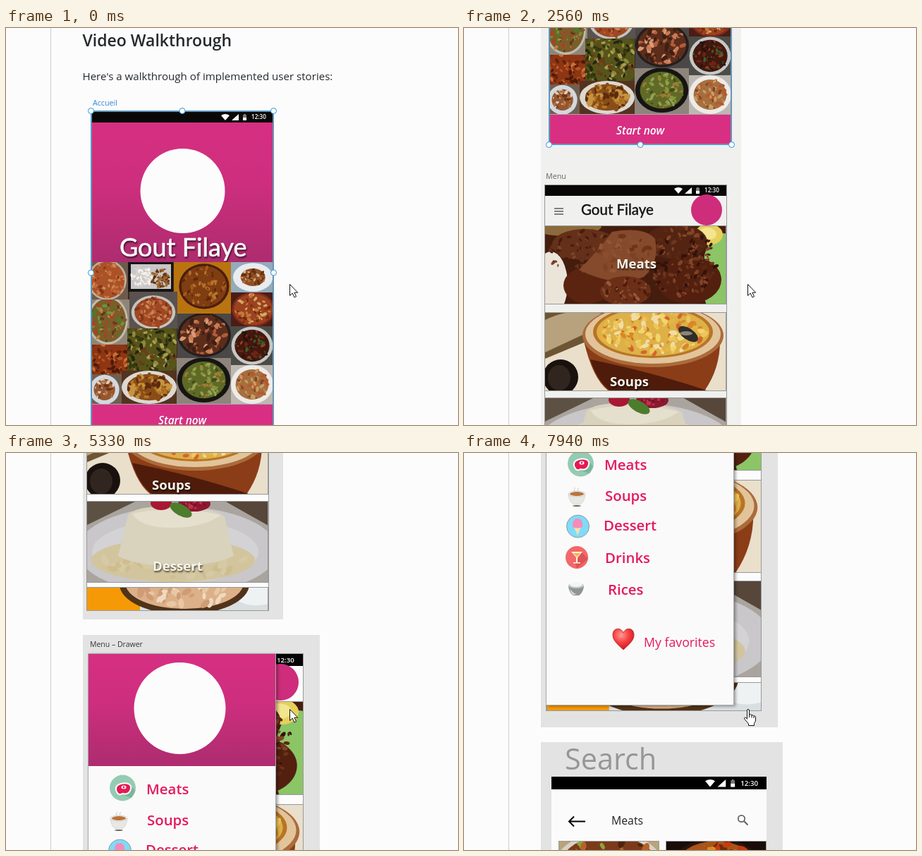
Write an HTML page that moves like this. It is 641 by 563 pixels and loops after 8 s.

```html
<!DOCTYPE html>
<html lang="en">
<head>
<meta charset="utf-8">
<title>Video Walkthrough</title>
<style>
  html, body { margin: 0; width: 100%; height: 100%; overflow: hidden; background: #fcfcfc; }
  #stage { display: block; width: 641px; height: 563px; font-family: "Open Sans", "Noto Sans", sans-serif; }
  .brand { font-family: Lato, "Open Sans", sans-serif; }
  .raised { filter: drop-shadow(1px 2px 1px rgba(0, 0, 0, .65)); }
  .drawer { filter: drop-shadow(2px 2px 2px rgba(0, 0, 0, .4)); }
  .board, .paper { fill: #fcfcfc; }
</style>
</head>
<body>
<svg id="stage" viewBox="0 0 641 563">
  <defs>
    <linearGradient id="pink" x2="0" y2="1">
      <stop offset="0" stop-color="#d62f82"/>
      <stop offset=".45" stop-color="#cd2e7d"/>
      <stop offset="1" stop-color="#ad2c6f"/>
    </linearGradient>
    <radialGradient id="heart" cx=".4" cy=".3" r=".8">
      <stop offset="0" stop-color="#ff9a96"/>
      <stop offset=".45" stop-color="#f8403f"/>
      <stop offset="1" stop-color="#c00d14"/>
    </radialGradient>
  </defs>
  <path d="M63.5 0V563" stroke="#cfcfcf"/>
  <g id="page"></g>
  <path id="arrow" d="M402.5 363.5v16l3.7-3.4 2.8 5.9 2.6-1.2-2.7-5.6h4.8z" fill="#fff" stroke="#111"/>
  <path id="hand" d="M401.5 365q0-1.5 1.5-1.5t1.5 1.5v6q3-1 3.5 .8 2.5-.6 3 1 2.5-.2 2.5 1.7v5.5l-2 3.5v3h-8v-2.5l-5.5-6.5q-1.2-2 .5-2.5 1.5 0 3 2.3z
    M404.5 371v4M408 372v3.5M411 373v3" fill="#fff" stroke="#111" opacity="0"/>
</svg>
<script>
const LOOP = 8000;
const BRAND = 'Gout Filaye';
const PINK = '#d82f83', ROSE = '#e5195f';

let seed = 41;
const rnd = () => (seed = seed * 16807 % 2147483647) / 2147483647;

const rect = (x, y, w, h, fill, more = '') =>
  `<rect x="${x}" y="${y}" width="${w}" height="${h}" fill="${fill}" ${more}/>`;
const oval = (cx, cy, rx, ry, fill, more = '') =>
  `<ellipse cx="${cx}" cy="${cy}" rx="${rx}" ry="${ry}" fill="${fill}" ${more}/>`;
const disc = (cx, cy, r, fill, more) => oval(cx, cy, r, r, fill, more);
const path = (d, fill, more = '') => `<path d="${d}" fill="${fill}" ${more}/>`;
const text = (x, y, size, label, fill, more = '') =>
  `<text x="${x}" y="${y}" font-size="${size}" fill="${fill}" ${more}>${label}</text>`;
const frame = (x, y, w, h, stroke = '#999') =>
  rect(x + .5, y + .5, w - 1, h - 1, 'none', `stroke="${stroke}"`);
const photo = (x, y, w, h, vw, vh, body) =>
  `<svg x="${x}" y="${y}" width="${w}" height="${h}" viewBox="0 0 ${vw} ${vh}" preserveAspectRatio="none">${body}</svg>`;
const SEMI = 'font-weight="600"', BOLD = 'font-weight="700"';

// Scatter small tilted flecks inside an ellipse.
function flecks(cx, cy, rx, ry, tones, count, size) {
  const colors = tones.split(' ');
  return Array.from({ length: count }, () => {
    const a = rnd() * 2 * Math.PI, d = Math.sqrt(rnd());
    const x = (cx + rx * d * Math.cos(a)).toFixed(1), y = (cy + ry * d * Math.sin(a)).toFixed(1);
    const s = size * (.5 + rnd());
    return oval(x, y, s.toFixed(1), (s * .55).toFixed(1), colors[rnd() * colors.length | 0],
      `transform="rotate(${rnd() * 180 | 0} ${x} ${y})"`);
  }).join('');
}

// A thumbnail: backdrop, rim of the plate or pot, food filling part of it.
function dish(x, y, w, h, back, rim, tones, { cx = .5, cy = .5, r = .5, fill = .9, size = 2.8, count = 75 } = {}) {
  const px = cx * w, py = cy * h, rx = r * w, ry = r * h;
  return photo(x, y, w, h, w, h, rect(0, 0, w, h, back) + oval(px, py, rx, ry, rim) +
    oval(px, py, rx * fill, ry * fill, tones.split(' ')[0]) +
    flecks(px, py, rx * fill * .95, ry * fill * .95, tones, count, size));
}

const meats = (x, y, w, h) => photo(x, y, w, h, 257, 110,
  rect(0, 0, 257, 110, '#451d0e') + oval(30, 0, 50, 14, '#8d6a3c') +
  oval(8, 82, 24, 46, '#ebe4d9') + oval(252, 72, 30, 62, '#8bc566') +
  oval(232, 12, 20, 15, '#e6cf5c') + oval(230, 11, 13, 9, '#f2e58e') +
  oval(56, 26, 46, 22, '#64301a') + oval(60, 84, 34, 26, '#5b2410') +
  oval(186, 22, 44, 25, '#532412') + oval(204, 76, 46, 34, '#532010') +
  flecks(56, 38, 50, 32, '#4a1c0d #7d4426 #64301a', 80, 3) +
  flecks(192, 50, 52, 50, '#34120a #6f351d #5b2814 #834427', 170, 3.2) +
  path('M48 62Q75 35 95 8Q140 0 156 18Q163 50 140 72Q100 88 48 62z', '#854a2b') +
  flecks(112, 40, 38, 26, '#7c4226 #925634 #8a4e2e #6c3519', 50, 4) +
  oval(114, 92, 36, 21, '#6b2f17') +
  flecks(114, 92, 35, 20, '#4d1c0c #82452a #955a38 #6b2f17', 60, 3));

const soups = (x, y, w, h) => photo(x, y, w, h, 257, 110,
  rect(0, 0, 257, 110, '#e9dfcb') + path('M0 0H100L60 40 0 65z', '#6d5533') +
  path('M0 10Q45-12 95 5L60 28 0 56z', '#b7a27d') +
  path('M55 40Q68 96 92 112H225Q248 80 248 40z', '#8b3d17') +
  path('M64 66Q75 100 95 112H235Q160 86 64 66z', '#4f1c0b') +
  oval(153, 32, 100, 45, '#ab6b3b') + oval(153, 30, 96, 42, '#e2c49b') +
  oval(153, 27, 85, 37, '#b97425') + oval(153, 27, 80, 34, '#ddb048') +
  flecks(153, 27, 75, 31, '#f2d56d #e3b645 #f0dda6 #d98727 #d1672a #efc65a', 150, 4.5) +
  oval(203, 30, 16, 8, '#2f2e2a', 'transform="rotate(35 203 30)"') + oval(200, 29, 9, 3, '#8a8578') +
  oval(22, 91, 25, 25, '#18110e') + oval(20, 92, 16, 18, '#30251f'));

const dessert = (x, y, w, h) => photo(x, y, w, h, 257, 115,
  rect(0, 0, 257, 115, '#aaa49f') + path('M0 0H70L0 34z', '#5d5143') +
  path('M195 0H257V35z', '#57463a') + oval(128, 70, 142, 62, '#c9c7c9') +
  oval(125, 72, 118, 45, '#d3d2d4') + oval(122, 84, 116, 31, '#d2c59e') +
  flecks(122, 88, 105, 20, '#d9cba0 #cdbd8f #d6caa4', 45, 6) +
  path('M58 20Q70 6 125 8T195 22L208 78Q180 92 124 92T44 78z', '#d9d2bd') +
  path('M64 18Q125 4 190 20Q165 38 120 38T64 18z', '#e5dfcd') +
  oval(105, 3, 15, 10, '#a81733') + oval(152, 4, 23, 11, '#8d1730') +
  flecks(150, 5, 18, 7, '#c2324d #741024', 16, 2.5) +
  oval(133, 13, 17, 8, '#4d7c2d', 'transform="rotate(28 133 13)"'));

const drinks = (x, y, w, h) => photo(x, y, w, h, 257, 33,
  rect(0, 0, 257, 33, '#d9dfe0') + rect(0, 0, 75, 33, '#f59a06') +
  oval(240, 8, 34, 18, '#eef2f2') + oval(138, -4, 92, 43, '#513319') +
  oval(138, -6, 84, 37, '#dcb089') + flecks(138, 6, 70, 20, '#e8c7a5 #cf9c76 #f0d9c1', 35, 6));

const status = (x, y, s, size) => `<g transform="translate(${x} ${y}) scale(${s})">` +
  path('M0 2Q6-2 12 2L6 9z M25 0V9H15z', '#fff') + rect(31, 1, 5, 8, '#777') +
  rect(32.5, 0, 2, 1, '#aaa') + rect(31, 5, 5, 4, '#fff') +
  text(43, 7.3, size, '12:30', '#fff', SEMI) + '</g>';

const banner = (x, y, w, h, cx, cy, r) =>
  rect(x, y, w, h, 'url(#pink)') + disc(cx, cy, r, '#fcfcfc', 'class="paper"');

function foodGrid() {
  return rect(122, 332, 257, 202, '#3d2a1c') +
    dish(122, 332, 51, 53, '#6e5a4a', '#bfae9d', '#ab5228 #c46c3a #84371a #cf8a52', { cx: .42, cy: .48, r: .54 }) +
    rect(173, 332, 64, 42, '#171416') + rect(177, 335, 57, 35, '#c9c7c8') +
    flecks(193, 352, 15, 14, '#efeae4 #f7f5f1 #d6d0ca', 60, 2.5) +
    flecks(219, 354, 13, 14, '#7b431b #5c2c0e #a0682f', 60, 2.5) +
    dish(238, 332, 81, 73, '#b9740f', '#4b1e0e', '#7f3d12 #a25a1c #5f270b #b8742c', { cx: .53, cy: .47, r: .44 }) +
    dish(319, 332, 60, 43, '#93abba', '#e9ecee', '#8f4e24 #b56c35 #66300f #d5b995', { cx: .52, r: .47, fill: .62, count: 40 }) +
    dish(122, 385, 53, 64, '#8f8577', '#c0bbae', '#7d5c2a #4c7a2a #b23c22 #6a943a #bd8240 #5b3a1a', { cx: .42, cy: .46, r: .54 }) +
    dish(175, 374, 68, 52, '#59524e', '#c4c3bf', '#a04823 #c0683a #7f351c #c9875a', { cy: .56, r: .46, fill: .86 }) +
    dish(319, 375, 60, 48, '#4b1d17', '#812a1d', '#9c421e #c07a3c #74260f #d6a869', { cx: .53, r: .51 }) +
    dish(122, 449, 50, 42, '#6a2b12', '#7c2a0e', '#8e3614 #b3541f #64220a #c97238 #4b1a0a', { r: .7 }) +
    dish(172, 426, 70, 60, '#3b3a16', '#4c4a19', '#57541a #8d8b3a #34390f #aa9d52 #6d3b1b #242810', { r: .7, size: 3.2, count: 170 }) +
    dish(243, 405, 76, 63, '#4b4746', '#241e1d', '#5c2d1b #c97b54 #d99a75 #b05c3b #3d2015', { cy: .48, r: .5, size: 3.8, count: 80 }) +
    dish(319, 423, 60, 55, '#4d4b46', '#c5c9c6', '#43180f #6b2614 #38602a #2b110d #924322', { r: .49, fill: .84 }) +
    dish(122, 491, 42, 42, '#6f5f50', '#d3d8de', '#96562f #d9cdbd #6b3319 #b3743d', { cx: .42, cy: .52, r: .5, fill: .72, count: 40 }) +
    dish(164, 486, 78, 47, '#53331f', '#dcd8d0', '#8a4d17 #b07426 #5b2b0d #c69440', { r: .5, fill: .8, size: 4 }) +
    dish(242, 468, 77, 65, '#8d847b', '#171513', '#5f6a26 #86943c #3f4d18 #a07b34 #94a052', { cy: .48, r: .49, fill: .82 }) +
    dish(319, 478, 60, 55, '#bdb8b2', '#eeebe7', '#a5703f #7b4725 #c99d63 #b9572f', { r: .5, fill: .78 });
}

function home() {
  const handles = [117.5, 347, 576.5].flatMap(y => [120.5, 250, 379.5].map(x => [x, y]))
    .filter(([x, y]) => x !== 250 || y !== 347);
  return text(123, 110, 10.7, 'Accueil', '#2b86d9') +
    rect(121, 118, 258, 16, '#080808') + status(305, 122, 1, 8.2) +
    banner(122, 134, 257, 198, 250.5, 231, 60) +
    text(161, 324, 36, BRAND, '#fcfcfc', 'class="brand raised" stroke="#fcfcfc" stroke-width=".6"') +
    foodGrid() + rect(122, 533, 257, 1, '#a9a9a9') + rect(122, 534, 257, 42, PINK) +
    text(250, 562, 15.5, 'Start now', '#fff', SEMI + ' font-style="italic" text-anchor="middle"') +
    frame(121, 118, 258, 458, '#8c8c8c') + frame(120, 117, 260, 460, '#3a9fe6') +
    handles.map(([x, y]) => disc(x, y, 4, '#fff', 'stroke="#2a94e0"')).join('');
}

function menu() {
  const label = (x, y, name) => text(x, y, 18.6, name, '#f6f6ec', BOLD + ' class="raised"');
  const box = (y, h) => frame(114, y, 258, h);
  return text(116, 625, 10.7, 'Menu', '#666') +
    rect(114, 633, 258, 458, '#fcfcfc', 'class="paper"') +
    rect(114, 633, 258, 16, '#080606') + status(298, 637, 1, 8.2) +
    [666, 670, 674].map(y => rect(128, y, 13, 2, '#808080')).join('') +
    text(166, 676, 20.5, BRAND, '#111', 'class="brand" stroke="#111" stroke-width=".4"') +
    disc(344, 669, 22, '#cd2d7b') +
    meats(115, 692, 257, 110) + box(691, 112) + soups(115, 815, 257, 110) + box(814, 112) +
    dessert(115, 935, 257, 115) + box(935, 116) + drinks(115, 1057, 257, 33) + box(1057, 34) +
    label(216, 752, 'Meats') + label(207, 919, 'Soups') + label(208, 1034, 'Dessert') +
    frame(114, 633, 259, 458);
}

function icons() {
  return disc(165.5, 1342, 18.5, '#94cbb3') + path('M160 1350l18 6 5-10-8-10z', '#7ab59b') +
    path('M156 1345q-1-7 7-9t12 1 1 9-11 4q-6 4-9-5z', '#e31b55', 'stroke="#fff" stroke-width="2"') +
    oval(167, 1341, 3.5, 2.5, '#fff') + disc(167, 1341, 1.4, '#e31b55') +
    path('M148 1385h24q-1 12-8 15h-8q-7-3-8-15z', '#e9e7e4', 'stroke="#c9c6c2" stroke-width=".6"') +
    oval(160, 1385, 12, 4, '#f6f4f0', 'stroke="#bbb" stroke-width=".6"') + oval(160, 1385, 10, 3, '#b9743c') +
    path('M157 1381q-2-3 1-5M162 1381q-2-3 1-5', 'none', 'stroke="#ccc"') + oval(160, 1402, 6, .8, '#333') +
    disc(161.5, 1431, 16, '#80dbf8', 'stroke="#888" stroke-width=".8"') +
    path('M156 1432h10l-5 12z', '#f5dfb2') + path('M154 1432q-1-12 7-12t7 12q-7 3-14 0z', '#f28db9') +
    disc(160, 1475, 16, '#f3686a') + path('M160 1491l16-14-9-9-9 15z', '#dc5457') +
    path('M152 1467h16l-7 8v7h4v1.5h-10v-1.5h4v-7z', '#fff3d8') + path('M154.5 1469h11l-5.5 5z', '#f7b53d') +
    path('M148 1516h22q-1 9-7 13h-8q-6-4-7-13z', '#8f9496') + path('M150 1519q4 7 10 8l-5 1q-4-3-5-9z', '#d8dcde') +
    oval(159, 1515, 11, 4, '#c3c6c7') + oval(159, 1513.5, 9, 3.5, '#f4f4f2') +
    path('M226 1606C216 1597 211 1592 211 1585C211 1574 223 1574 226 1582C229 1574 241 1574 241 1585C241 1592 236 1597 226 1606z',
      'url(#heart)', 'stroke="#a6282b" stroke-width=".8"');
}

function drawer() {
  const item = (x, y, name) => text(x, y, 20.4, name, ROSE, SEMI);
  const box = (y, h) => frame(117, y, 305, h);
  return text(119, 1142, 10.5, 'Menu – Drawer', '#333') +
    rect(117, 1151, 305, 541, '#fcfcfc') + rect(117, 1151, 305, 18, '#050505') +
    text(384, 1164, 9.7, '12:30', '#fff', SEMI) + disc(389, 1192, 26, '#cd2d7b') +
    meats(117, 1220, 304, 131) + box(1219, 133) + soups(117, 1366, 304, 131) + box(1365, 132) +
    dessert(117, 1508, 304, 136) + box(1508, 137) + drinks(117, 1652, 304, 40) + box(1652, 41) +
    frame(116, 1151, 306, 542) +
    `<g class="drawer">${rect(117, 1151, 266, 533, '#fafafa')}</g>` +
    banner(117, 1152, 266, 159, 246.5, 1229, 65) + frame(116, 1151, 267, 534, '#aaa') + icons() +
    item(199, 1351, 'Meats') + item(200, 1395, 'Soups') + item(198, 1437, 'Dessert') +
    item(200, 1483, 'Drinks') + item(204, 1528, 'Rices') +
    text(255, 1602, 17.7, 'My favorites', ROSE);
}

function search() {
  return text(143, 1776, 41.4, 'Search', '#969696') +
    rect(124, 1786, 305, 200, '#fbfbfb') + rect(124, 1786, 305, 18, '#000') + status(342, 1790, 1.17, 8.3) +
    path('M172 1849.5H149M156 1842.5l-7 7 7 7', 'none', 'stroke="#000" stroke-width="2"') +
    text(209, 1854, 15.8, 'Meats', '#222') +
    disc(393.5, 1845.5, 4.7, 'none', 'stroke="#666" stroke-width="1.8"') +
    path('M397 1849l5.5 5.5', 'none', 'stroke="#666" stroke-width="2.2"') +
    dish(135, 1878, 141, 90, '#b9a37c', '#d9d2c4', '#7b3b1b #b5622b #4f2310 #8aa63a', { cy: .4, r: .55, size: 6 }) +
    dish(287, 1878, 141, 90, '#180d08', '#2b140a', '#a8541a #d98a25 #6e2a0c #c9390f', { cy: .4, r: .45, size: 6 }) +
    frame(134, 1877, 143, 92) + frame(286, 1877, 143, 92);
}

const board = (y, w, h, fill, more) => rect(109, y, w, h, fill, more);
const page = document.getElementById('page');
page.innerHTML =
  board(92, 284, 1011, '#fcfcfc', 'class="board"') + board(1125, 336, 591, '#e3e3e3') + board(1737, 343, 300, '#e3e3e3') +
  text(108.5, 26, 23, 'Video Walkthrough', '#24292e', SEMI) +
  text(108.5, 74, 15.1, "Here's a walkthrough of implemented user stories:", '#24292e') +
  home() + menu() + drawer() + search();

// [ms, scroll offset]
const SCROLL = [
  [0, 0], [150, 57], [320, 73],
  [910, 88], [1045, 128], [1180, 170], [1315, 187], [1450, 205], [1585, 250], [1715, 289], [1850, 301],
  [2260, 318], [2410, 365], [2560, 411], [2700, 425], [2830, 465], [2970, 515], [3100, 529],
  [3390, 545], [3540, 595], [3690, 635], [3840, 643],
  [4580, 680], [4730, 730], [4880, 757], [5030, 775], [5180, 825], [5330, 867], [5450, 871],
  [5600, 905], [5750, 1000], [5900, 1075], [6050, 1099],
  [6930, 1145], [7070, 1198], [7210, 1213],
  [7530, 1232], [7670, 1280], [7800, 1318], [7940, 1327],
];

function play(target, prop, steps) {
  const last = steps[steps.length - 1][1];
  const frames = [...steps, [LOOP, last]]
    .map(([ms, value]) => ({ offset: ms / LOOP, [prop]: value, easing: 'step-end' }));
  target.animate(frames, { duration: LOOP, iterations: Infinity });
}

play(page, 'transform', SCROLL.map(([ms, y]) => [ms, `translateY(${-y}px)`]));
play(document.getElementById('arrow'), 'opacity', [[0, 1], [5600, 0]]);
play(document.getElementById('hand'), 'opacity', [[0, 0], [5600, 1]]);
for (const el of document.querySelectorAll('.board')) play(el, 'fill', [[0, '#fcfcfc'], [910, '#f0f0ef'], [3390, '#e3e3e3']]);
for (const el of document.querySelectorAll('.paper')) play(el, 'fill', [[0, '#fcfcfc'], [910, '#f0f0ef'], [3390, '#fcfcfc']]);
</script>
</body>
</html>
```
